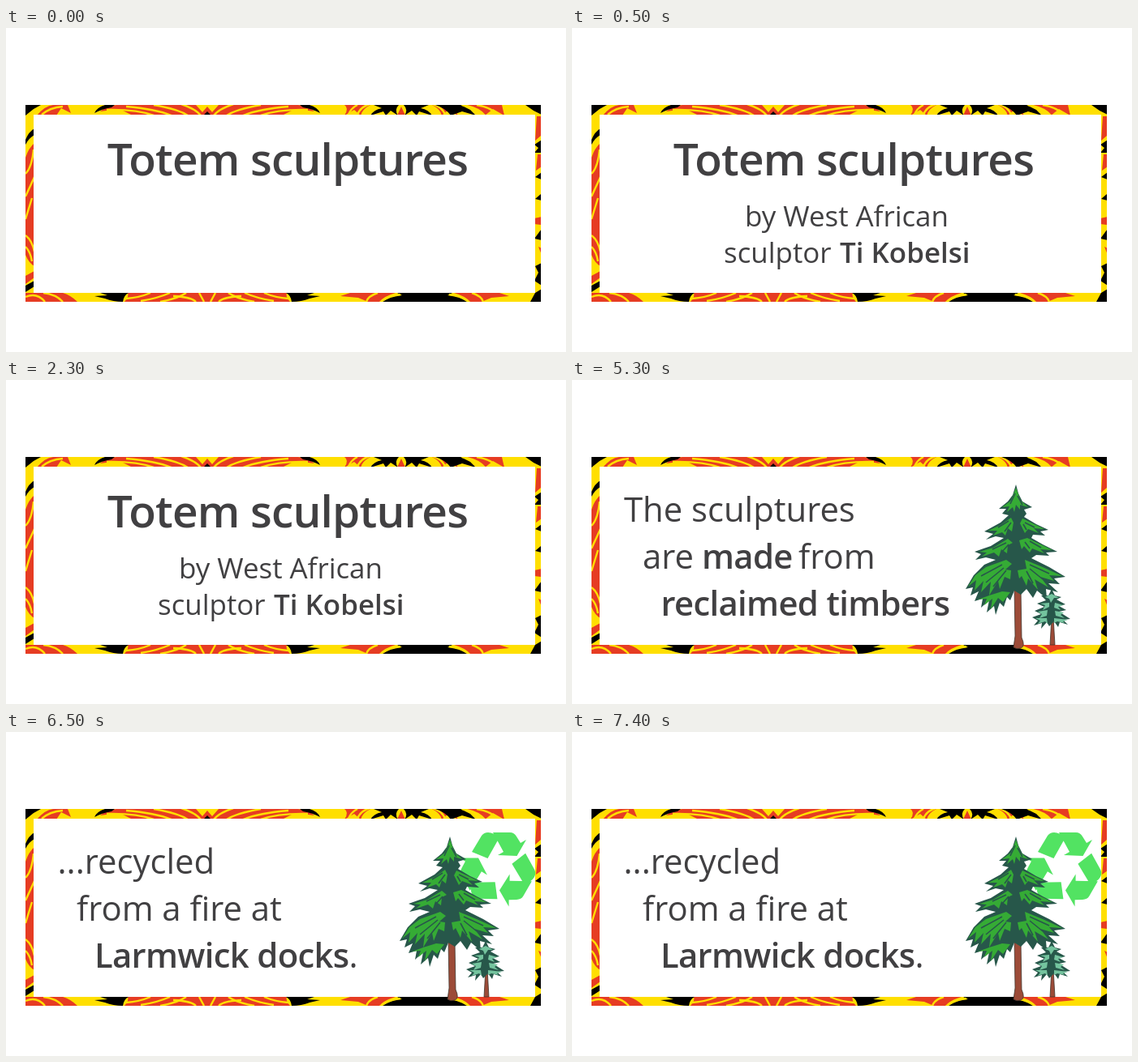
An HTML page for the animation above (8000 ms loop, 690 by 400 pixels).

```html
<!DOCTYPE html>
<html lang="en">
<head>
<meta charset="utf-8">
<title>Totem sculptures</title>
<style>
  html, body { margin: 0; width: 100%; height: 100%; overflow: hidden; background: #fff; }
  svg { display: block; width: 690px; height: 400px; }
  text { font-family: "Open Sans", "Noto Sans", sans-serif; font-size: 41.8px; fill: #414042; white-space: pre; }
  .title { font-size: 55px; font-weight: 600; letter-spacing: -.8px; }
  .bold { font-weight: 600; letter-spacing: -.65px; }
  .credit text { font-size: 34.9px; letter-spacing: 0; }
  .red { fill: #e63c23; }
  .black { fill: #000; }
  .streak { fill: none; stroke: #ffdf00; stroke-width: 2.4; }
  .dark { fill: #27574a; }
  .slit { fill: none; stroke: #27574a; stroke-width: 1.6; }
  .leaf { fill: #35ab35; }
  .mint { fill: #74c49e; }
  .bark { fill: #9c4b38; stroke: #40352d; stroke-width: .8; }
</style>
</head>
<body>
<svg viewBox="0 0 690 400">
  <defs>
    <clipPath id="band"><path d="M24 95H659V338H24Z"/></clipPath>

    <!-- halves of the mirrored ornaments, axis at x = 0 -->
    <g id="topFan">
      <path class="red" d="M0 108V97L6 104L14 95H112Q126 97 132 103Q116 100 104 102L92 108Z"/>
      <path class="black" d="M114 95H126Q136 98 139 105Q130 100 118 98ZM0 103L5 108H0Z"/>
      <path class="streak" d="M8 108Q14 100 32 94M24 108Q36 100 66 95M44 108Q64 100 100 97M66 108Q88 100 124 101"/>
    </g>
    <g id="topLeaf">
      <path class="black" d="M3 95H34L24 99Q34 101 38 108L22 103L19 108L13 102L4 108Q9 101 3 95Z"/>
      <path class="red" d="M38 95H70Q64 99 70 108L58 101L50 108Q48 100 38 95ZM0 97L5 108H0Z"/>
      <path class="streak" d="M39 94Q52 98 54 108M54 95Q62 99 65 107"/>
    </g>
    <g id="baseFan">
      <path class="red" d="M0 327H98Q96 331 102 338H0Z"/>
      <path class="black" d="M97 327H132L123 330L139 331L126 334Q116 338 104 338Q103 330 97 327Z"/>
      <path class="streak" d="M4 338L10 327M14 338Q20 332 42 331M26 327Q36 334 58 338M46 327Q62 334 82 337M70 327Q84 333 100 334"/>
    </g>
    <g id="baseLeaf">
      <path class="black" d="M0 327H34L28 330Q46 331 54 338H0Z"/>
      <path class="red" d="M36 327H92L104 331L82 333L70 338H56Q50 331 36 327Z"/>
      <path class="streak" d="M30 329Q46 331 55 339M58 327Q70 331 72 338"/>
    </g>

    <path id="arrow" d="M574 148L586 128Q589 124 594 124Q601 124 607.5 131L593.5 156Z
      M600 124H621Q626 124 629 129L634 137L641 133L629.5 153L606 152L613 148Z"/>
  </defs>

  <g clip-path="url(#band)">
    <path fill="#ffdf00" d="M24 95H659V338H24Z"/>
    <use href="#topFan" x="248"/>
    <use href="#topFan" transform="translate(248) scale(-1 1)"/>
    <use href="#topLeaf" x="487"/>
    <use href="#topLeaf" transform="translate(487) scale(-1 1)"/>
    <path class="black" d="M529 95H560L572 101L579 108L562 103L548 108Q542 99 529 95Z"/>
    <path class="red" d="M566 95H611L614 108L600 100L590 108Q582 99 566 95Z"/>
    <path class="streak" d="M562 95Q582 98 590 108M580 95Q598 98 604 106"/>
    <use href="#baseFan" x="248"/>
    <use href="#baseFan" transform="translate(248) scale(-1 1)"/>
    <use href="#baseLeaf" x="516"/>
    <use href="#baseLeaf" transform="translate(516) scale(-1 1)"/>

    <!-- left side -->
    <path class="black" d="M24 95H43L34 100L24 108ZM24 138Q28 128 35 124V132Q28 136 24 144ZM24 318L35 312V319L24 326Z"/>
    <path class="red" d="M38 108Q48 96 58 95H76L80 105L68 99L62 108ZM24 160Q28 148 35 142V294Q28 290 24 280ZM24 306L35 300V308L24 316Z
      M24 327H70Q80 330 88 338H24Z"/>
    <path class="streak" d="M44 107Q54 98 70 97M24 180Q32 172 34 150M24 208L35 184M24 236L32 210M24 256Q32 262 35 276M24 270Q30 276 32 288
      M24 332Q38 326 48 338M46 327Q62 329 70 338"/>

    <!-- right side -->
    <path class="black" d="M640 95H660V107L650 102ZM660 138L651 144L656 148L651 154H660ZM660 178L652 184L660 187ZM660 204L652 211L660 213Z
      M660 248L651 260L660 262ZM660 290L652 294L656 302L651 312L660 318ZM652 327L660 322V338H646Z"/>
    <path class="red" d="M654 109H660V132L652 139ZM655 156H660V171L653 176ZM651 235L660 233V243L651 242ZM656 270L660 272V280Z"/>
  </g>
  <path fill="#fff" d="M34 107H652V327H34Z"/>

  <g data-from="0" data-to="3500">
    <text class="title" x="347" y="182" text-anchor="middle">Totem sculptures</text>
  </g>
  <g class="credit" data-from="500" data-to="3500">
    <text x="213" y="245">by West African</text>
    <text x="187" y="290">sculptor</text>
    <text class="bold" x="330" y="290">Ti Kobelsi</text>
  </g>
  <g data-from="3500" data-to="6500">
    <text x="64" y="175">The sculptures</text>
    <text x="87" y="233">are</text>
    <text class="bold" x="160" y="233">made</text>
    <text x="279" y="233">from</text>
    <text class="bold" x="109.5" y="291">reclaimed timbers</text>
  </g>
  <g data-from="6500" data-to="8000">
    <text x="63.5" y="175">...recycled</text>
    <text x="87" y="233">from a fire at</text>
    <text x="109" y="291"><tspan class="bold">Larmwick docks</tspan>.</text>
    <g fill="#52e362">
      <use href="#arrow"/>
      <use href="#arrow" transform="rotate(120 606.5 168)"/>
      <use href="#arrow" transform="rotate(240 606.5 168)"/>
    </g>
  </g>

  <g data-from="3500" data-to="8000">
    <path class="bark" d="M545 258H553L554 318Q559 329 553 331Q548 333 544 330L546 316Z"/>
    <path class="dark" d="M547 129L550 140L555 150L567 157L557 160L560 165L557 169L572 178L587 185L577 187L583 192L568 191L566 195L580 203
      L598 212L584 213L588 217L572 216L566 220L588 231L608 243L594 245L601 252L587 251L599 262L584 258L585 270L573 260L568 269L560 258L553 265
      L545 260L540 272L536 268L532 280L527 275L522 290L520 279L511 287L514 272L504 281L506 270L496 273L501 261L491 266L494 256L485 258
      L495 241L508 228L522 222L510 219L497 222L504 215L496 212L516 205L532 195L522 193L510 197L519 190L508 187L528 176L538 167L530 165
      L535 159L526 159L537 150L543 142Z"/>
    <path class="leaf" d="M547 133L541 149L530 157L539 156L536 163L543 157L545 163L547 154L552 160L552 154L562 157L553 149Z
      M541 170L528 179L513 186L524 186L519 192L530 188L534 192L537 183L542 187L544 176Z
      M555 171L582 184L569 183L575 189L562 184L558 189L552 177Z
      M537 196L519 207L502 212L511 213L505 218L520 213L526 218L529 209L536 214L537 204L543 201Z
      M561 195L592 210L577 209L582 214L567 208L564 213L557 205L554 209L551 198Z"/>
    <path class="leaf" d="M535 222L510 231L497 241L488 255L498 247L496 260L507 248L504 262L516 249L514 266L525 248L527 258L533 243L540 246L541 235L534 234L542 227Z
      M558 222L580 231L604 242L588 241L594 248L577 243L587 256L570 246L574 259L562 245L560 254L554 242L551 245L549 235L560 233Z
      M530 261L514 266L500 271L511 270L508 278L518 270L516 283L525 269L531 274L540 262Z"/>
    <path class="slit" d="M546 140L540 153M549 143L555 154M538 174L525 182M541 176L533 187M558 176L570 182M556 178L560 185
      M535 201L518 209M538 203L530 212M564 199L578 207M558 200L564 208M530 228L504 242M532 232L510 250M535 235L519 255
      M564 228L588 239M564 233L580 246M560 236L568 251"/>

    <path class="bark" d="M591 292H593L595 327H589Z"/>
    <path class="dark" d="M591 258L595 266L603 268L597 271L608 277L600 279L609 284L600 286L614 295L605 296L611 302L601 299L599 305L594 298L588 304
      L585 299L578 307L579 300L569 303L574 297L567 293L578 289L570 285L582 280L573 276L584 272L578 266L587 266Z"/>
    <path class="mint" d="M591 264L583 268L588 270L590 275L594 269L600 269ZM588 275L577 276L583 278L580 284L588 280ZM595 275L605 278L599 280L602 284L594 281Z
      M586 284L574 286L579 289L576 294L585 291ZM595 285L606 287L602 290L607 294L596 291ZM585 294L571 294L577 297L574 301L583 298L586 301ZM594 294L611 296L605 298L607 300L598 298L594 300Z"/>
  </g>
</svg>
<script>
  const LOOP = 8000;
  const scenes = [...document.querySelectorAll("[data-from]")];

  function draw() {
    const time = performance.now() % LOOP;
    for (const scene of scenes) {
      const { from, to } = scene.dataset;
      scene.style.display = time >= +from && time < +to ? "" : "none";
    }
    requestAnimationFrame(draw);
  }
  draw();
</script>
</body>
</html>
```
